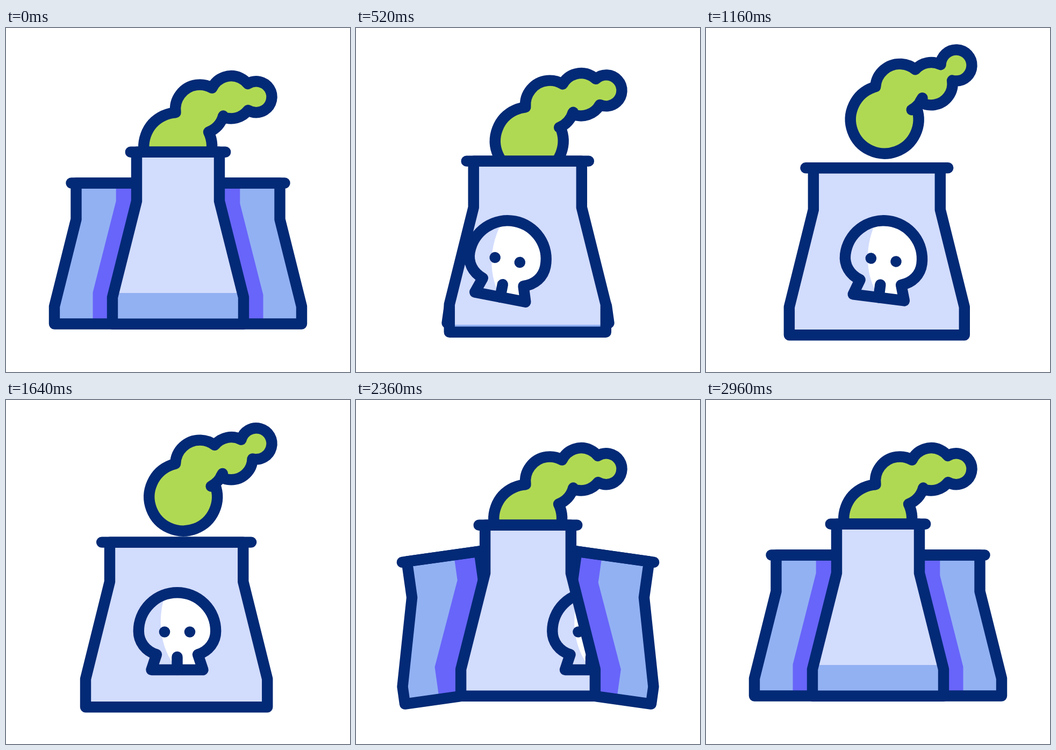
Recreate the animation shown at these times as an HTML page with a canvas. Size 640 by 640 pixels, loop 3 s.

```html
<!DOCTYPE html>
<html lang="en">
<head>
<meta charset="utf-8">
<title>Cooling towers</title>
<style>
html, body { margin: 0; width: 100%; height: 100%; overflow: hidden; background: #fff; }
canvas { display: block; width: 100vmin; height: 100vmin; margin: auto; }
</style>
</head>
<body>
<canvas id="stage" width="640" height="640"></canvas>
<script>
const ctx = document.getElementById('stage').getContext('2d');
const LOOP = 3000, STEP = 40, DEG = Math.PI / 180;
const NAVY = '#032a76', PALE = '#d2dcfd', BLUE = '#92b1f3',
      PURPLE = '#6865fa', GREEN = '#b0d953', WHITE = '#fff';

// Eased 0 to 1 between times a and b.
function smooth(t, a, b) {
  const u = Math.min(1, Math.max(0, (t - a) / (b - a)));
  return u * u * (3 - 2 * u);
}
// Eased up between a and b, back down between c and d.
const hump = (t, a, b, c, d) => smooth(t, a, b) - smooth(t, c, d);

// The front tower widens and narrows in two pushes each way.
const widen = t => 0.6 * smooth(t, 120, 672) + 0.4 * smooth(t, 767, 1440)
                 - 0.7 * smooth(t, 1580, 2140) - 0.3 * smooth(t, 2000, 2505);
const sink = t => hump(t, 120, 726, 1720, 2230);
const bandTop = t => 493 + 70 * hump(t, 120, 653, 2360, 2920);
const smokeRise = t => hump(t, 364, 903, 1435, 2150);
const slide = t => 100 * hump(t, 120, 691, 1480, 2300);
const tilt = t => 8.2 * hump(t, 120, 560, 1640, 2040) - 8 * hump(t, 1860, 2360, 2400, 2920);
const shadeShift = t => hump(t, 120, 560, 2380, 2920);
const skullX = t => 100 + 232 * smooth(t, 160, 674) - 13.5 * smooth(t, 1060, 1520)
                  + 237 * smooth(t, 2040, 2680);
const skullTurn = t => 11 * (1 - smooth(t, 900, 1560));

function trace(points, close = true) {
  ctx.beginPath();
  points.forEach(([x, y]) => ctx.lineTo(x, y));
  if (close) ctx.closePath();
}
function fill(color) { ctx.fillStyle = color; ctx.fill(); }
function stroke() { ctx.strokeStyle = NAVY; ctx.stroke(); }
function line(x0, y0, x1, y1) {
  trace([[x0, y0], [x1, y1]], false);
  stroke();
}
function dot(x, y, r) {
  ctx.beginPath();
  ctx.arc(x, y, r, 0, Math.PI * 2);
  fill(NAVY);
}

function towerOutline({ cx, wall, base, top, knee, low, bottom }) {
  const side = s => [[cx + s * wall, top], [cx + s * wall, knee],
                     [cx + s * base, low], [cx + s * base, bottom]];
  return [...side(-1), ...side(1).reverse()];
}
function strokeTower(tower) {
  trace(towerOutline(tower));
  stroke();
  line(tower.cx - tower.lip, tower.top, tower.cx + tower.lip, tower.top);
}

// Where two circles cross; side -1 is left of the way from a to b, 1 is right.
function crossing(a, b, side) {
  const dx = b.x - a.x, dy = b.y - a.y, d = Math.hypot(dx, dy);
  const along = (d * d + a.r * a.r - b.r * b.r) / (2 * d);
  const off = side * Math.sqrt(Math.max(0, a.r * a.r - along * along));
  return [a.x + (dx * along - dy * off) / d, a.y + (dy * along + dx * off) / d];
}
function onCircle({ x, y, r }, degrees) {
  return [x + r * Math.cos(degrees * DEG), y + r * Math.sin(degrees * DEG)];
}

function drawSmoke(t) {
  const k = smokeRise(t);
  const ball = (x, y, r, rise) => ({ x, y: y - rise * k, r });
  const big = ball(319.7 + 12.5 * k, 220.5, 63.3, 50.3);
  const mid = ball(360.6, 151, 45.5, 38.6);
  const small = ball(419, 128.8, 39.6, 25.1);
  const tip = ball(465.5, 128.3, 29, 58.8);

  // Each ball with the notch its arc ends in, clockwise.
  const route = [
    [big, crossing(big, mid, -1)],
    [mid, crossing(mid, small, -1)],
    [small, crossing(small, tip, -1)],
    [tip, crossing(small, tip, 1)],
    [small, onCircle(mid, 16 + 7 * k)],
    [mid, onCircle(mid, 69 - 8 * k)]
  ];
  let from = route[route.length - 1][1];
  ctx.beginPath();
  for (const [{ x, y, r }, to] of route) {
    const angle = p => Math.atan2(p[1] - y, p[0] - x);
    ctx.lineTo(...from);
    ctx.arc(x, y, r, angle(from), angle(to));
    from = to;
  }
  ctx.closePath();
  fill(GREEN);
  stroke();
}

const SIDE = { cx: 198.5, wall: 68, base: 108.5, lip: 77,
               top: 288.5, knee: 356, low: 518, bottom: 550.5 };

function drawSideTower(t, front, shadeDrop) {
  const { cx, wall, base, top, knee, low, bottom } = SIDE;
  const v = shadeShift(t);
  ctx.save();
  // Keep the base from showing under the front tower.
  ctx.beginPath();
  ctx.rect(0, 0, 320, front.bottom);
  ctx.rect(0, 0, 320 - front.base, 640);
  ctx.clip();

  ctx.translate(cx + slide(t), bottom + 18.5 * sink(t));
  ctx.rotate(tilt(t) * DEG);
  ctx.translate(-cx, -bottom);
  trace(towerOutline(SIDE));
  fill(BLUE);
  const shadeTop = 204.7 + 14 * v, shadeLow = 161.5 - 7 * v;
  trace([[shadeTop, top], [shadeTop, 322 + 14 * v + shadeDrop],
         [shadeLow, 492 - 2 * v + shadeDrop], [shadeLow, bottom],
         [cx + base, bottom], [cx + base, low], [cx + wall, knee], [cx + wall, top]]);
  fill(PURPLE);
  strokeTower(SIDE);
  ctx.restore();
}

function drawSideTowers(t, front) {
  drawSideTower(t, front, 0);
  ctx.save();
  ctx.translate(640, 0);
  ctx.scale(-1, 1);
  drawSideTower(t, front, 4.5);
  ctx.restore();
}

function traceSkull() {
  const r = 71.7;
  ctx.beginPath();
  ctx.moveTo(-38.5, 43.5);
  ctx.bezierCurveTo(-59, 37, -r, 20, -r, 0);
  ctx.arc(0, 0, r, Math.PI, 0);
  ctx.bezierCurveTo(r, 20, 59, 37, 38.5, 43.5);
  ctx.lineTo(48, 72);
  ctx.lineTo(-48, 72);
  ctx.closePath();
}

function drawSkull(t) {
  ctx.save();
  ctx.translate(skullX(t), 430);
  ctx.rotate(skullTurn(t) * DEG);
  traceSkull();
  fill(WHITE);
  ctx.save();
  ctx.clip();
  ctx.beginPath();
  ctx.moveTo(-20, -75);
  ctx.bezierCurveTo(-37, -30, -37, 30, 4, 75);
  ctx.lineTo(-80, 75);
  ctx.lineTo(-80, -75);
  fill(PALE);
  ctx.restore();
  traceSkull();
  stroke();
  line(0, 48, 0, 72);
  dot(-23.5, 1.5, 10.3);
  dot(23.5, 1.5, 10.3);
  ctx.restore();
}

function frontTower(t) {
  const w = widen(t), s = sink(t);
  return {
    cx: 320 - 3 * w * w,
    wall: 77 + 48.2 * w,
    base: 122 + 48.2 * w,
    lip: 88.2 + 52 * w,
    top: 230.7 + 34.7 * w,
    knee: 322 + 16 * s,
    low: 501 + 18 * s,
    bottom: 550.7 + 20.6 * s
  };
}

function drawFrontTower(t, front) {
  trace(towerOutline(front));
  fill(PALE);
  ctx.save();
  ctx.clip();
  ctx.fillStyle = BLUE;
  ctx.fillRect(0, bandTop(t), 640, 200);
  drawSkull(t);
  ctx.restore();
  strokeTower(front);
}

function draw(t) {
  const front = frontTower(t);
  ctx.fillStyle = WHITE;
  ctx.fillRect(0, 0, 640, 640);
  ctx.lineWidth = 20.4;
  ctx.lineCap = ctx.lineJoin = 'round';
  drawSmoke(t);
  drawSideTowers(t, front);
  drawFrontTower(t, front);
}

const start = performance.now();
function tick() {
  const t = (performance.now() - start) % LOOP;
  draw(Math.floor(t / STEP) * STEP);
  requestAnimationFrame(tick);
}
tick();
</script>
</body>
</html>
```
